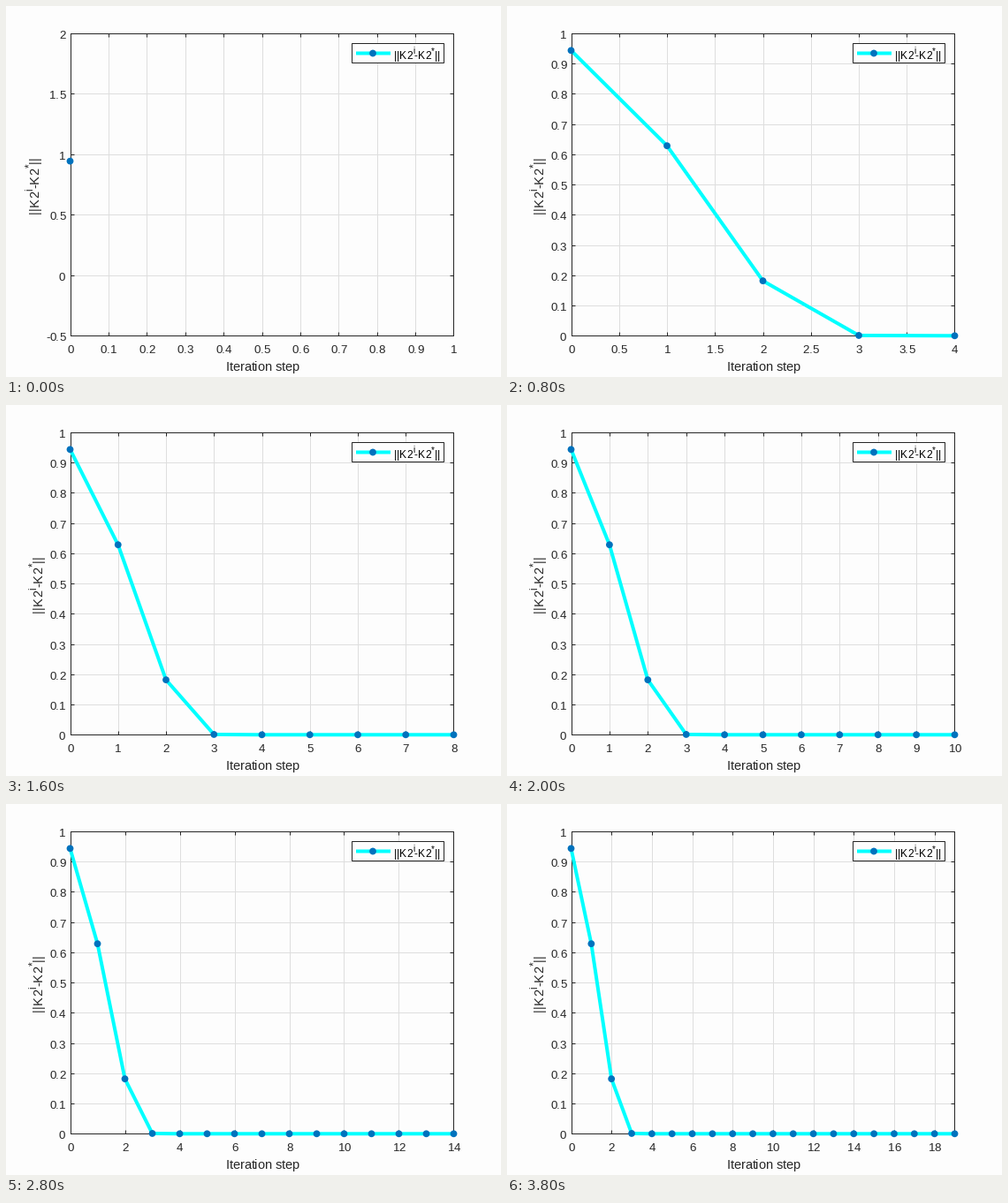
Write a matplotlib script that moves like this. It is 560x420 px and loops after 4 s.

```python
import numpy as np
import matplotlib.pyplot as plt
from matplotlib.animation import FuncAnimation
from matplotlib.patches import Circle, Rectangle

W, H = 560, 420
LEFT, RIGHT, TOP, BOTTOM = 72.51, 506.495, 30.8, 373.3
PX = 0.72  # points per pixel at 100 dpi
STEPS = 20
INK, GRID, CYAN, BLUE = "#262626", "#dedede", "#00ffff", "#0072bd"
PAPER = "#fdfdfd"
NORM = "||K2^i-K2^*||"
SUP_SCALE, SUP_RAISE = 0.8, 0.46

# Advance widths in em; anything else is 0.556
ADVANCE = {"|": 0.26, "K": 0.667, "-": 0.333, "i": 0.222, "*": 0.389, ".": 0.278,
           "I": 0.278, "t": 0.278, "r": 0.333, " ": 0.278, "s": 0.5}

plt.rcParams["font.family"] = "Liberation Sans"

error = np.zeros(STEPS)
error[:4] = 0.943, 0.628, 0.1815, 0.001

fig = plt.figure(figsize=(W / 100, H / 100), dpi=100, facecolor=PAPER)
ax = fig.add_axes([LEFT / W, 1 - BOTTOM / H, (RIGHT - LEFT) / W, (BOTTOM - TOP) / H],
                  facecolor=PAPER)
ax.set_axisbelow(True)
ax.grid(color=GRID, lw=PX)
ax.tick_params(direction="in", length=4.3 * PX, width=PX, color=INK,
               top=True, right=True, labelleft=False, labelbottom=False)
for spine in ax.spines.values():
    spine.set(color=INK, linewidth=PX)

# Overlay in pixel units for text, markers and legend
stage = fig.add_axes([0, 0, 1, 1], zorder=2)
stage.set(xlim=(0, W), ylim=(H, 0))
stage.axis("off")

LINE = dict(color=CYAN, lw=4 * PX, snap=False, clip_on=False,
            solid_capstyle="butt", solid_joinstyle="round")
curve, = ax.plot([], [], zorder=5, **LINE)


def glyphs(text, size):
    """Yield char, size, rise and whole-pixel advance; ^ raises the next char."""
    raised = False
    for c in text:
        if c == "^":
            raised = True
            continue
        em = size * (SUP_SCALE if raised else 1)
        yield c, em, size * SUP_RAISE * raised, round(em * ADVANCE.get(c, 0.556))
        raised = False


def write(x, y, text, size, align=0, color=INK, vertical=False):
    """Typeset text glyph by glyph; align is 0 left, 0.5 centre, 1 right."""
    run = list(glyphs(text, size))
    pos = -align * sum(g[3] for g in run)
    out = []
    for c, em, rise, advance in run:
        at = (x - rise, y - pos) if vertical else (x + pos, y - rise)
        out.append(stage.text(*at, c, fontsize=em * PX, color=color, va="baseline",
                              rotation=90 * vertical, rotation_mode="anchor"))
        pos += advance
    return out


def dot(x, y):
    return stage.add_patch(Circle((x, y), 3.9, fc=BLUE, lw=0, snap=False,
                                  zorder=4, clip_on=False))


def draw_legend():
    stage.add_patch(Rectangle((391, 42), 104, 22, fc=PAPER, ec=INK, lw=PX))
    stage.plot([396, 435], [53.5, 53.5], **LINE)
    dot(415, 53.5)
    write(439, 60, NORM, 12, color="black")


def x_step(span):
    return next(s for s in (0.1, 0.2, 0.5, 1, 2) if span / s < 11.01)


def y_axis(k):
    """Lower limit, upper limit, tick step and label column shift."""
    special = {0: (-0.5, 2, 0.5, 4), 1: (0.6, 0.95, 0.05, 7), 2: (0.1, 1, 0.1, 0)}
    return special.get(k, (0, 1, 0.1, 0))


def ticks(lo, hi, step):
    return np.round(lo + step * np.arange(int((hi - lo) / step + 1.001)), 2)


write(290, 413, "Iteration step", 14.67, 0.5)
draw_legend()
moving = []


def update(k):
    while moving:
        moving.pop().remove()

    span = max(k, 1)
    lo, hi, step, shift = y_axis(k)
    xs, ys = ticks(0, span, x_step(span)), ticks(lo, hi, step)
    ax.set_xticks(xs)
    ax.set_yticks(ys)
    ax.set(xlim=(0, span), ylim=(lo, hi))
    curve.set_data(np.arange(k + 1), error[:k + 1])

    def px(v):
        return LEFT + (RIGHT - LEFT) * v / span

    def py(v):
        return BOTTOM - (BOTTOM - TOP) * (v - lo) / (hi - lo)

    for i in range(k + 1):
        moving.append(dot(px(i), py(error[i])))
    for v in xs:
        moving.extend(write(px(v), 393, f"{v:g}", 13.33, 0.5))
    for v in ys:
        moving.extend(write(67, py(v) + 6, f"{v:g}", 13.33, 1))
    moving.extend(write(41 - shift, 235, NORM, 14.67, vertical=True))
    return [curve, *moving]


anim = FuncAnimation(fig, update, frames=STEPS, init_func=lambda: [],
                     interval=200, repeat=True, repeat_delay=0)
plt.show()
```
